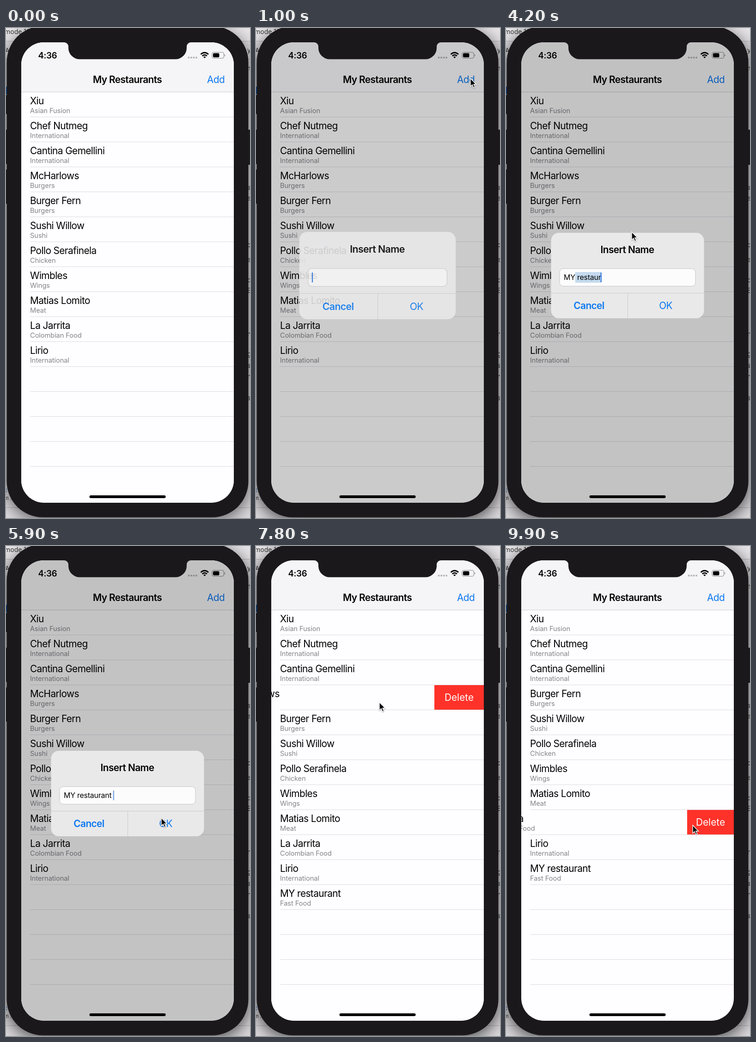
Write an HTML page that moves like this. It is 528 px wide and 1060 px high and loops after 10 s.

```html
<!DOCTYPE html>
<html lang="en">
<head>
<meta charset="utf-8">
<title>My Restaurants</title>
<style>
  html, body { margin: 0; width: 100%; height: 100%; overflow: hidden; background: #d8d6d9; }
  svg { display: block; width: 528px; height: 1060px; }
  text { font-family: Inter, "Noto Sans", sans-serif; font-size: 20.8px; letter-spacing: -.58px; }
  .bold { font-weight: 600; }
  .mid { text-anchor: middle; }
  .sub { font-size: 14.7px; letter-spacing: -.1px; fill: #858387; }
  .blue { fill: #0b79f0; }
  .field { font-size: 15.9px; letter-spacing: -.2px; }
  .delete { fill: #fff; letter-spacing: 0; }
  .page text { font-size: 14px; letter-spacing: 0; fill: #333; }
</style>
</head>
<body>
<svg id="stage" viewBox="0 0 528 1060">
  <defs>
    <clipPath id="glass"><rect x="33" y="31" width="460" height="996" rx="49"/></clipPath>
    <filter id="blur" x="-20%" y="-20%" width="140%" height="140%"><feGaussianBlur stdDeviation="18"/></filter>
  </defs>

  <g class="page" id="page">
    <rect width="528" height="1060" fill="#dddbde"/>
    <rect width="528" height="28" fill="#e6e4e7"/>
    <path d="M0 28.5H528M0 67.5H528M0 1037.5H528" stroke="#b5b3b6"/>
    <path d="M0 145H3V186H0ZM0 220H3V294H0ZM0 306H3V380H0ZM523 220H528V296H523Z" fill="#29272a"/>
    <rect y="127" width="2" height="16" fill="#1a6fd0"/>
    <text x="-3" y="13">mode 12</text>
    <text x="-2" y="54">A</text>
    <text x="-5" y="1004" style="fill:#1769c5">c</text>
    <text x="-4" y="1021" style="font-size:11px">m .</text>
  </g>

  <rect id="shadow" x="2" y="6" width="523" height="1060" rx="78" filter="url(#blur)"/>
  <rect x="1.5" y="-4" width="523" height="1062.5" rx="78" fill="#1a181b"/>

  <g clip-path="url(#glass)">
    <rect x="33" y="31" width="460" height="996" fill="#fefdff"/>
    <g id="rows"></g>
    <rect x="33" y="31" width="460" height="107.500" fill="#fefdff"/>
    <rect id="nav" x="33" y="31" width="460" height="107.500" fill="#f5f4f6"/>
    <path d="M33 138.5H493" stroke="#cfcdd0"/>
    <text class="bold mid" x="262.500" y="119">My Restaurants</text>
    <text class="blue" x="435" y="119">Add</text>

    <text class="bold mid" x="90" y="65.5" style="font-size:18.5px;letter-spacing:-.2px">4:36</text>
    <path d="M395.500 64h.01M401 64h.01M406.500 64h.01M412 64h.01" stroke="#b4b2b5" stroke-width="4" stroke-linecap="round"/>
    <g fill="none" stroke="#000" stroke-width="2.700">
      <path d="M421.500 57Q429.700 49.500 438 57M424.700 60.400Q429.700 56 434.900 60.400"/>
      <path d="M427 62.500Q429.700 60.500 432.500 62.500L429.700 65.600Z" fill="#000" stroke="none"/>
    </g>
    <rect x="446" y="52.500" width="25.500" height="13" rx="4" fill="none" stroke="#8d8b8e" stroke-width="1.200"/>
    <rect x="448" y="54.500" width="13.500" height="9" rx="2.200"/>
    <path d="M473 57Q476 59 473 61.500Z" fill="#8d8b8e"/>
    <rect id="dim" x="33" y="31" width="460" height="996"/>
    <rect x="180.500" y="1011" width="165" height="6" rx="3"/>
  </g>
  <path d="M126 29V31A9 9 0 0 1 135 40V43A24.500 24.500 0 0 0 159.500 67.500H366.500A24.500 24.500 0 0 0 391 43V40A9 9 0 0 1 400 31V29Z" fill="#1a181b"/>

  <g id="alert">
    <rect x="97.500" y="443" width="331" height="185" rx="17" fill="#e9e9ea"/>
    <text class="bold mid" x="262.500" y="487">Insert Name</text>
    <rect id="field" x="116" y="520.500" width="294" height="38" rx="8" stroke="#c5c4c7"/>
    <rect id="mark" y="528" height="23" fill="#c5daee"/>
    <text id="typed" class="field" x="125" y="545"></text>
    <rect id="caret" y="529" width="2.200" height="21" fill="#2f74dc"/>
    <path d="M97.500 573.500H428.500M263.500 573.500V628" stroke="#c9c8ca"/>
    <text class="bold mid blue" x="179.500" y="608">Cancel</text>
    <text class="mid blue" x="345.500" y="608">OK</text>
  </g>

  <path id="mouse" d="M0 0V17.500L4 13.800L6.800 20.300L9.800 19L7 12.700H12.400Z" stroke="#fff" stroke-width="1.400" style="filter:drop-shadow(0 1px 1px rgba(0,0,0,.35))"/>
</svg>
<script>
const LOOP = 10000, STEP = 100, ROW = 54, TOP = 138.5, RIGHT = 493;
const $ = id => document.getElementById(id);

function add(parent, tag, attrs, text) {
  const el = document.createElementNS('http://www.w3.org/2000/svg', tag);
  set(el, attrs);
  if (text) el.textContent = text;
  return parent.appendChild(el);
}
function set(el, attrs) {
  for (const k in attrs) el.setAttribute(k, attrs[k]);
}

const places = [
  ['Xiu', 'Asian Fusion'], ['Chef Nutmeg', 'International'],
  ['Cantina Gemellini', 'International'], ['McHarlows', 'Burgers'],
  ['Burger Fern', 'Burgers'], ['Sushi Willow', 'Sushi'],
  ['Pollo Serafinela', 'Chicken'], ['Wimbles', 'Wings'],
  ['Matias Lomito', 'Meat'], ['La Jarrita', 'Colombian Food'],
  ['Lirio', 'International'], ['MY restaurant', 'Fast Food']
];
const REMOVED = 3, SWIPED = 9, ADDED = 11;

const rows = Array.from({ length: 16 }, (_, i) => {
  const g = add($('rows'), 'g', {});
  add(g, 'rect', { x: 33, width: 460, height: ROW, fill: '#fefdff' });
  const label = add(g, 'g', {});
  const [name, kind] = places[i] || [];
  if (name) {
    add(label, 'text', { x: 52, y: 26.5 }, name);
    add(label, 'text', { x: 52, y: 45.5, class: 'sub' }, kind);
  }
  const line = add(g, 'path', { d: 'M52 54H493', stroke: '#dddbde' });
  const row = { g, label, line };
  if (i === REMOVED || i === SWIPED) {
    row.red = add(g, 'rect', { y: 0, height: ROW, fill: '#ff3229' });
    row.word = add(g, 'text', { y: 34.5, class: 'delete mid' }, 'Delete');
  }
  return row;
});
// Separators stay above the white of the row that follows
rows.forEach(({ g, line }) => g.prepend(line) || g.append(line));

// Letters of the page behind the phone that peek out on the right
[['y', 53], ['m', 92], ['s', 350], ['e', 373], ['c', 474], ['e', 506], ['d', 550], ['E', 573],
 ['n', 667], ['g', 710], ['s', 735], ['n', 759], ['s', 805]]
  .forEach(([ch, y]) => add($('page'), 'text', { x: 522, y }, ch));

const mousePath = [
  [0, 535, 226], [600, 464, 109], [1200, 464, 109], [1800, 272, 441],
  [5400, 272, 441], [5800, 336, 588], [6600, 336, 588], [7300, 400, 338],
  [7500, 400, 338], [7800, 267, 338], [8000, 267, 338], [8300, 436, 328],
  [8700, 436, 328], [9200, 395, 604], [9350, 395, 604], [9600, 285, 604],
  [9700, 285, 604], [9900, 404, 604]
];
const swipes = {
  [REMOVED]: [[7500, 0], [7800, 107], [8000, 101]],
  [SWIPED]: [[9350, 0], [9600, 112], [9800, 103], [9900, 101]]
};
const words = 'MY\u00a0restaurant\u00a0';
const keys = [1900, 2100, 2300, 2500, 2900, 3200, 3400, 3700, 3900, 4100, 4400, 4600, 4800, 5100];

const ramp = (t, a, b) => Math.min(1, Math.max(0, (t - a) / (b - a)));
const easeOut = p => 1 - (1 - p) ** 3;
const smooth = p => p * p * (3 - 2 * p);

function track(table, t) {
  let i = 0;
  while (i < table.length - 2 && t > table[i + 1][0]) i++;
  const a = table[i], b = table[i + 1];
  const p = smooth(ramp(t, a[0], b[0]));
  return a.slice(1).map((v, k) => v + (b[k + 1] - v) * p);
}

function drawList(t) {
  const gone = smooth(ramp(t, 8350, 8700));
  rows.forEach((row, i) => {
    const y = TOP + ROW * i - (i > REMOVED ? ROW * gone : 0);
    set(row.g, { transform: `translate(0 ${y})` });
    if (!row.red) return;
    const [s] = track(swipes[i], t);
    set(row.label, { transform: `translate(${-s} 0)` });
    set(row.red, { x: RIGHT - s, width: s });
    set(row.word, { x: RIGHT - s / 2, opacity: s > 60 ? 1 : 0 });
  });
  set(rows[REMOVED].g, { visibility: gone < 1 ? 'visible' : 'hidden' });
  set(rows[ADDED].label, { opacity: t >= 6300 ? 1 : 0 });
  set(rows[15].line, { opacity: gone });
}

function drawAlert(t) {
  const shown = easeOut(ramp(t, 800, 1200));
  const p = shown * (1 - easeOut(ramp(t, 5900, 6270)));
  const scale = 1 + .18 * (1 - shown);
  set($('dim'), { opacity: .23 * p });
  set($('nav'), { opacity: 1 - .7 * p });
  set($('alert'), {
    opacity: p,
    transform: `translate(263 535.5) scale(${scale}) translate(-263 -535.5)`
  });
  const grey = Math.round(252 - 120 * (1 - p) ** 1.5);
  set($('field'), { fill: `rgb(${grey},${grey},${grey})` });

  const count = keys.filter(k => k <= t).length;
  const typed = $('typed');
  typed.textContent = words.slice(0, count);
  const end = 125 + (count ? typed.getComputedTextLength() : 0);
  const last = count ? keys[count - 1] : 1000;
  const idle = t - last;
  const blink = idle < 400 ? 1 : .5 + .5 * Math.cos(idle * Math.PI / 500);
  set($('caret'), { x: end - 1, opacity: t < 6000 ? blink : 0 });

  const marked = t >= 3700 && t < 5100;
  const from = marked ? 125 + typed.getSubStringLength(0, 2) : 125;
  set($('mark'), { x: from, width: marked ? end - from : 0 });
}

function draw(now) {
  const t = Math.floor(now % LOOP / STEP) * STEP;
  drawList(t);
  drawAlert(t);
  set($('shadow'), { opacity: t < 800 ? .6 : .7 });
  set($('mouse'), { transform: `translate(${track(mousePath, t)})` });
}

// Each row is painted over the foot of the one below it, so its line stays whole
rows.slice().reverse().forEach(row => $('rows').append(row.g));

const start = performance.now();
function tick() {
  draw(performance.now() - start);
  requestAnimationFrame(tick);
}
tick();
</script>
</body>
</html>
```
